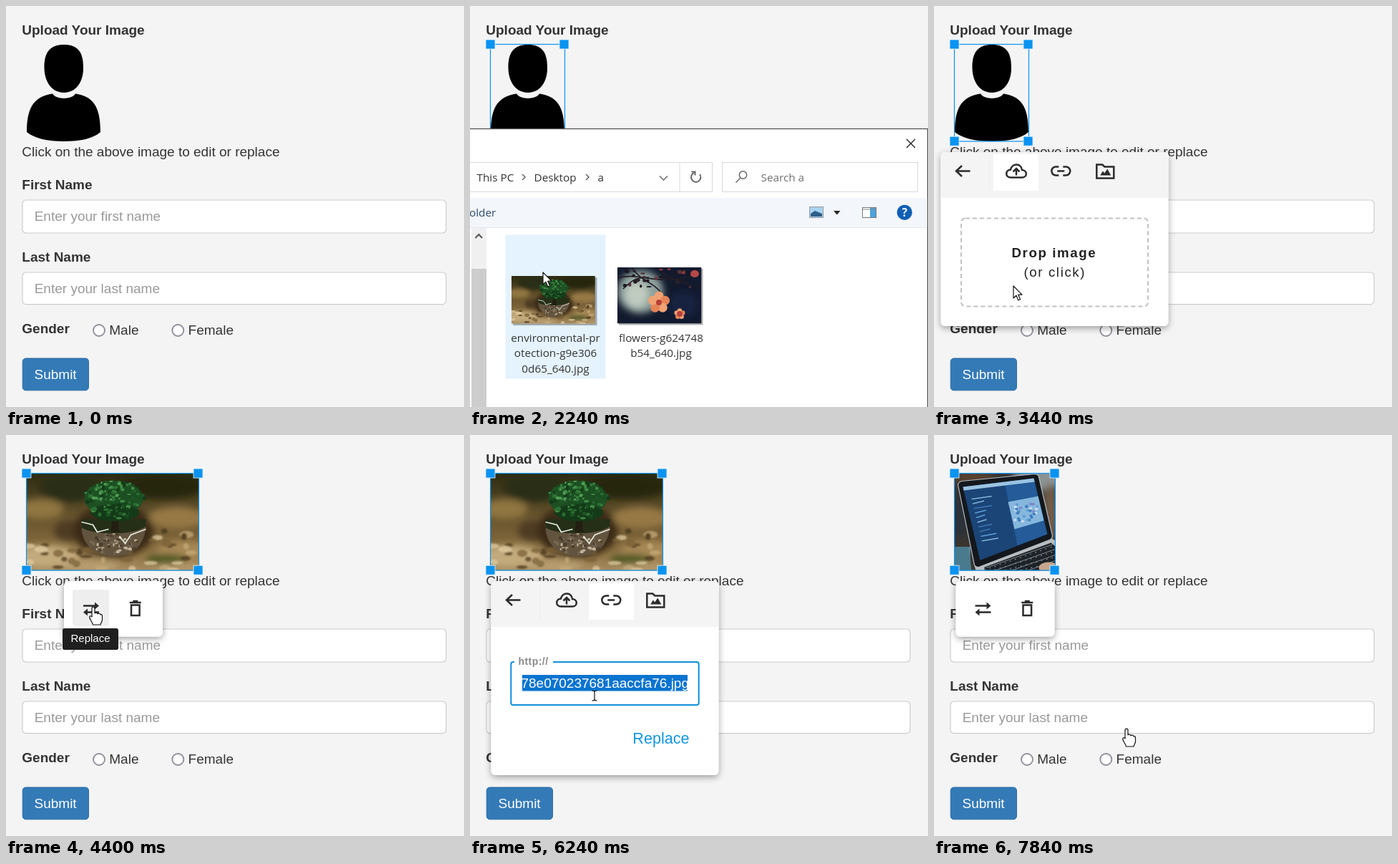
Write an HTML page that moves like this. It is 640 px wide and 560 px high and loops after 8000 ms.

```html
<!DOCTYPE html>
<html lang="en">
<head>
<meta charset="utf-8">
<title>Image upload form</title>
<style>
html, body { margin: 0; width: 100%; height: 100%; overflow: hidden; background: #f4f4f4; }
svg { display: block; width: 100vw; height: 100vh; }
text { font: 19px "Liberation Sans", Arial, sans-serif; fill: #333; white-space: pre; }
.b { font-weight: 700; }
.hint { fill: #999; }
.win text { font: 15.3px "Open Sans", "Noto Sans", sans-serif; fill: #333; }
.box { fill: #fff; stroke: #ccc; stroke-width: 1.2; }
.icon { fill: none; stroke: #2b2b2b; stroke-width: 2.5; }
.icon .full { fill: #2b2b2b; stroke: none; }
.thin { fill: none; stroke: #666; stroke-width: 1.5; }
.cursor { fill: #fff; stroke: #111; stroke-width: 1.2; stroke-linejoin: round; }
.mid { text-anchor: middle; }
</style>
</head>
<body>
<svg id="stage" viewBox="0 0 640 560" preserveAspectRatio="none" xmlns="http://www.w3.org/2000/svg"></svg>
<script>
const LOOP = 8000, STEP = 80;

let seed = 11;
const rnd = (a, b) => {
  seed = (seed * 16807) % 2147483647;
  return a + (b - a) * seed / 2147483647;
};
const many = (n, f) => Array.from({ length: n }, (_, i) => f(i)).join('');
const rect = (x, y, w, h, more = '') => `<rect x="${x}" y="${y}" width="${w}" height="${h}" ${more}/>`;
const path = (d, more = '') => `<path d="${d}" ${more}/>`;
const text = (x, y, s, more = '') => `<text x="${x}" y="${y}" ${more}>${s}</text>`;
const oval = (x, y, rx, ry, fill, more = '') =>
  `<ellipse cx="${x}" cy="${y}" rx="${rx}" ry="${ry}" fill="${fill}" ${more}/>`;
const pick = list => list[Math.floor(rnd(0, list.length))];
const group = (id, body, more = '') => `<g id="${id}" ${more}>${body}</g>`;
const at = (x, y, body) => `<g class="icon" transform="translate(${x} ${y})">${body}</g>`;

// Small ovals strewn evenly over a larger oval
const strew = (n, x, y, rx, ry, size, colours) => many(n, () => {
  const a = rnd(0, 6.28), r = Math.sqrt(rnd(0, 1));
  return oval(x + rx * r * Math.cos(a), y + ry * r * Math.sin(a), rnd(1, size), rnd(1, size * .8), pick(colours));
});

// Icons, each centred on its origin
const icons = {
  back: path('M10.5 0H-9M-1-7.5L-9 0L-1 7.5'),
  cloud: path('M-7.5 9C-16 9-15.5-1.5-8-2C-6-11.5 7-11.5 8-1.5C16-1 15.5 9 8 9Z') +
    path('M0 6V-3M-4.5 1L0-3.5L4.5 1'),
  link: path('M-3-6H-7A6 6 0 0 0-7 6H-3M3-6H7A6 6 0 0 1 7 6H3M-5 0H5'),
  folder: path('M-12-9H-4L-1-6H12V10H-12Z') + path('M-7 6L-3.5 0L-1 3L3-3L8 6Z', 'class="full"'),
  swap: path('M-11-4H7M11 5H-7') + path('M5-9L11-4L5 1ZM-5 0L-11 5L-5 10Z', 'class="full"'),
  bin: path('M-8-8.5H8M-3.5-10.5H3.5M-5.8-5V9.5H5.8V-5Z')
};

const avatar =
  path('M81 54C100 54 108.5 64 108 87C108 107 97 121 81 121C65 121 54 107 53.5 87C53 64 62 54 81 54Z') +
  path('M65 122.5C42 126 29 138 29 176C40 185 58 189 81 189C104 189 122 185 132 176C132 138 120 126 97 122.5C92 131 70 131 65 122.5Z');

const treePhoto = rect(0, 0, 242, 136, 'fill="url(#earth)"') +
  `<g filter="url(#soft)">` +
  oval(20, 50, 32, 14, '#8f7440') + oval(210, 62, 40, 15, '#967844') + oval(62, 20, 44, 20, '#2b2d14') +
  oval(190, 18, 60, 18, '#27270f') + oval(60, 80, 22, 14, '#4e3a20') + oval(122, 80, 56, 38, '#3a2b17') +
  oval(28, 116, 46, 16, '#c2aa7c') + oval(90, 130, 40, 9, '#b79d70') + oval(218, 108, 36, 14, '#a58755') +
  oval(195, 120, 28, 7, '#4a541f') + oval(215, 132, 40, 6, '#b59a6a') +
  `</g><g filter="url(#grain)" opacity=".75">` +
  many(44, () => oval(rnd(0, 242), rnd(80, 136), rnd(3, 10), rnd(2, 5), pick(['#e0cba0', '#7b6237', '#4a391f', '#c4aa78']))) +
  `</g>` +
  path('M77 70C75 98 95 116 122 116C150 116 168 98 167 68Z', 'fill="#62543f"') +
  path('M77 76C95 87 150 87 167 74V64H77Z', 'fill="#252f17"') +
  strew(60, 122, 98, 35, 14, 3, ['#a3947a', '#473d2d', '#c0b296', '#776952']) +
  path('M121 50L118 82H130L126 50Z', 'fill="#231d12"') +
  oval(122, 35, 41, 25, '#1c4f22') + oval(124, 55, 34, 12, '#143a18') +
  strew(110, 122, 36, 43, 27, 4, ['#2c7032', '#1e5526', '#3f8a45', '#133a19', '#184820']) +
  strew(30, 112, 24, 28, 14, 3, ['#4f9c52', '#347c39']) +
  path('M77 68L93 72L99 82L115 78M130 88L138 98L146 86L167 78', 'fill="none" stroke="#e4e8dc" stroke-width="1.8"');

const flowerPhoto = rect(0, 0, 117.5, 78.5, 'fill="#121a2e"') +
  `<g filter="url(#soft)">${oval(32, 34, 32, 30, '#8ea19d')}${oval(27, 38, 16, 18, '#c0cbc0')}${oval(92, 52, 20, 18, '#17233f')}</g>` +
  path('M0 15C30 5 60 30 117 8M20 0C34 22 55 20 66 44M58 0C70 20 90 16 104 26M8 30C20 18 26 14 44 14', 'fill="none" stroke="#241d25" stroke-width="1.7"') +
  many(26, () => oval(rnd(8, 112), rnd(2, 28), rnd(1.5, 4), rnd(1, 3), pick(['#2a2029', '#55303a', '#8e3b3c', '#1b1822']))) +
  oval(108, 9, 6, 5, '#b6484a') +
  [[58, 49], [87, 65]].map(([x, y], i) => many(5, k => {
    const a = k * 1.257 - 1.57, r = i ? 4.5 : 9;
    return oval(x + r * Math.cos(a), y + r * Math.sin(a), r * .72, r * .72, k % 2 ? '#e58458' : '#f0a273');
  }) + oval(x, y, 4, 4, '#b8403a')).join('');

const laptopPhoto = rect(0, 0, 141, 136, 'fill="#3a3531"') +
  `<g filter="url(#soft)">${oval(118, 6, 36, 18, '#8b9391')}${oval(25, 6, 30, 12, '#56402f')}${oval(8, 60, 12, 30, '#2c3337')}${oval(134, 55, 12, 40, '#6f5b48')}</g>` +
  rect(0, 103, 22, 33, 'fill="#6b9aab"') + path('M0 103H20L24 136H0Z', 'fill="#4a7a8e"') +
  path('M28 129L136 91L141 94V136H30Z', 'fill="#b9bdc0"') +
  path('M5 16Q6 12 10 11L112 1Q117 1 118 5L137 87Q137 91 133 93L34 131Q30 132 28 128Z', 'fill="#14181d" stroke="#b4bcc2" stroke-width="1.2"') +
  path('M12 19L111 7L130 85L36 121Z', 'fill="#245b98"') +
  path('M12 19L70 12L88 101L36 121Z', 'fill="#1b4477"') +
  path('M75 40L117 32L125 66L84 78Z', 'fill="#86b7dd"') +
  path('M12 19L111 7L112 12L13 24Z', 'fill="#9bc3e2"') +
  many(10, i => path(`M${24 + i * 1.6} ${36 + i * 6.5}l${rnd(10, 32)} -4`, `stroke="${pick(['#5c9fd8', '#3b78b5', '#7fb5d6'])}" stroke-width="1.4"`)) +
  many(30, () => oval(rnd(84, 116), rnd(42, 68), 2.2, 1.8, pick(['#3d7bbd', '#c9dcec', '#5d9cd0', '#7c86c4']))) +
  path('M42 131L135 97L141 102V130L122 136H42Z', 'fill="#1d2328"') +
  many(5, r => path(`M${42 + r * 7} ${135 + r * 2}L141 ${101 + r * 8}`, 'stroke="#a9b2b8" stroke-width="1.1" stroke-dasharray="1.5 6"') +
    path(`M${44 + r * 9} ${132 + r * 5}L141 ${98 + r * 8}`, 'stroke="#8d969c" stroke-width=".9"')) +
  oval(132, 132, 14, 8, '#c9a58b');

const field = (y, h, hint) => rect(23, y, 592, h, 'rx="5" class="box"') + text(39.7, y + 28.8, hint, 'class="hint"');
const radio = (x, label) => `<circle cx="${x}" cy="453" r="8" fill="#fff" stroke="#8f8f9d" stroke-width="1.9"/>` + text(x + 14.3, 459, label);
const form = rect(0, 0, 640, 560, 'fill="#f4f4f4"') +
  [[39.6, 'Upload Your Image'], [256.3, 'First Name'], [357, 'Last Name'], [456.6, 'Gender']]
    .map(([y, s]) => text(22.3, y, s, 'class="b"')).join('') +
  text(22.3, 209.6, 'Click on the above image to edit or replace') +
  field(271, 46, 'Enter your first name') + field(372, 44.6, 'Enter your last name') +
  radio(130, 'Male') + radio(240.3, 'Female') +
  rect(23.2, 492, 92.3, 44.8, 'rx="4.5" fill="#337ab7" stroke="#2e6da4"') +
  text(39.5, 520.7, 'Submit', 'style="fill:#fff"');

const bar = rect(0, 204, 138, 77.5, 'rx="6" fill="#fff" filter="url(#drop)"') +
  group('hover', rect(12, 216, 51, 51, 'rx="4" fill="#eee"')) +
  at(38, 242.6, icons.swap) + at(99.8, 242.6, icons.bin) +
  group('tip', rect(-2, 270, 78, 30, 'rx="3" fill="#1f1f1f"') +
    text(37, 289, 'Replace', 'class="mid" style="fill:#fff;font-size:15px"'));

const panel = (h, tab, body) => rect(9.5, 204, 318, h, 'rx="6" fill="#fff" filter="url(#drop)"') +
  path('M9.5 268V210Q9.5 204 15.5 204H321.5Q327.5 204 327.5 210V268Z', 'fill="#f4f4f4"') +
  path('M77.5 209V258', 'stroke="#ededed"') + rect(tab, 207, 63, 51, 'fill="#fff"') +
  at(40, 230.5, icons.back) + at(115, 230.5, icons.cloud) + at(177.3, 230.5, icons.link) + at(239.3, 230.5, icons.folder) + body;

const dropPanel = panel(243, 83,
  rect(38, 296.5, 261, 123, 'rx="6" fill="none" stroke="#c2c2c2" stroke-width="2" stroke-dasharray="6 4"') +
  text(108.5, 350.5, 'Drop image', 'class="b" style="fill:#222;font-size:18.7px;letter-spacing:1.6px"') +
  text(125.5, 377.8, '(or click)', 'style="fill:#222;font-size:18.7px;letter-spacing:1.6px"'));

const linkPanel = panel(271, 146,
  rect(37.3, 317, 262.4, 60, 'id="frame" rx="3" fill="#fff" stroke-width="2"') +
  rect(42, 312, 54, 10, 'fill="#fff"') +
  text(47.5, 321, 'http://', 'class="b" style="fill:#8a8a8a;font-size:14px;letter-spacing:.45px"') +
  `<g clip-path="url(#entry)">${rect(53, 335, 231, 22.5, 'id="mark" fill="#0a74d0"')}` +
  text(286, 353, '', 'id="url" text-anchor="end"') + '</g>' +
  text(207.3, 430.8, 'Replace', 'style="fill:#1496e0;font-size:21.6px"'));

const lines = (x, list) => list.map((s, i) => text(x, 469 + i * 21.4, s, 'class="mid"')).join('');
const dialog = rect(-2, 171.5, 641.5, 392, 'fill="#fff" stroke="#555" stroke-width="1.3"') +
  path('M610 186L622 198M622 186L610 198', 'stroke="#222" stroke-width="1.4"') +
  `<g fill="#fff" stroke="#d9d9d9">${rect(-5, 218.5, 343.5, 41)}${rect(352.5, 218.5, 273, 41)}${path('M293 218V259')}</g>` +
  text(9.5, 245, 'This PC') + text(89.5, 245, 'Desktop') + text(178.5, 245, 'a') +
  text(406.5, 245, 'Search a', 'style="fill:#707070"') +
  `<g class="thin">${path('M73 235L77 239L73 243M162 235L166 239L162 243M265 237.5L270.5 243L276 237.5')}` +
  path('M321 235A6.7 6.7 0 1 1 313 233', 'stroke-width="2"') + path('M309.5 231.5H314.5V236.5', 'stroke-width="2"') +
  `<circle cx="381.5" cy="236" r="5.2"/>${path('M378 240L371.5 246.5')}</g>` +
  rect(0, 268, 639, 41, 'fill="#f3f6fa"') + path('M0 309.5H639', 'stroke="#e3e8ee"') +
  text(-1, 294, 'older', 'style="fill:#2b4a6f"') +
  rect(474.5, 280.5, 19, 15, 'fill="#a9d3f2" stroke="#9a9a9a"') + path('M476 294V290L482 286L492 290V294Z', 'fill="#2e5f88"') +
  path('M508 286H517.5L512.8 291.5Z', 'fill="#222"') +
  rect(548.5, 281.5, 19, 14, 'fill="#fff" stroke="#777"') + rect(559, 282, 8, 13, 'fill="#4da3dc"') + path('M549 284H567', 'stroke="#888"') +
  '<circle cx="607.3" cy="288.3" r="10.6" fill="#0f5fb5"/>' +
  text(607.3, 294, '?', 'class="mid" style="fill:#fff;font-weight:700"') +
  rect(2, 310, 21, 250, 'fill="#f0f0f0"') + rect(2, 367, 21, 193, 'fill="#cdcdcd"') +
  path('M7.5 324L12.3 319L17 324', 'fill="none" stroke="#555" stroke-width="2"') +
  rect(49.5, 319.5, 140, 201, 'id="item"') +
  rect(60, 379, 117.5, 67, 'fill="#000" opacity=".3"') + rect(208, 367, 117.5, 78.5, 'fill="#000" opacity=".3"') +
  '<use href="#tree" transform="translate(58 377) scale(.484 .49)"/>' +
  `<g transform="translate(206 365)" clip-path="url(#flowerBox)">${flowerPhoto}</g>` +
  lines(119.5, ['environmental-pr', 'otection-g9e306', '0d65_640.jpg']) +
  lines(267, ['flowers-g624748', 'b54_640.jpg']);

const clip = (id, x, y, w, h) => `<clipPath id="${id}">${rect(x, y, w, h)}</clipPath>`;
const defs = `<defs>
  <linearGradient id="earth" x2="0" y2="1"><stop stop-color="#2c2b12"/><stop offset=".4" stop-color="#62502b"/><stop offset=".75" stop-color="#84693d"/><stop offset="1" stop-color="#a68b5e"/></linearGradient>
  <filter id="soft" x="-20%" y="-20%" width="140%" height="140%"><feGaussianBlur stdDeviation="5"/></filter>
  <filter id="grain"><feGaussianBlur stdDeviation="1.3"/></filter>
  <filter id="drop" x="-20%" y="-20%" width="140%" height="150%"><feDropShadow dx="0" dy="3" stdDeviation="5" flood-opacity=".36"/></filter>
  ${clip('treeBox', 0, 0, 241, 136)}${clip('flowerBox', 0, 0, 117.5, 78.5)}${clip('laptopBox', 0, 0, 141, 136)}${clip('entry', 53, 330, 231, 32)}
  <g id="tree" clip-path="url(#treeBox)">${treePhoto}</g></defs>`;

const handles = many(4, () => rect(0, 0, 13, 13, 'class="grip" fill="#0a93f0" stroke="#e6f3fc" stroke-width=".8"'));

document.getElementById('stage').innerHTML = defs + form +
  group('img0', avatar) +
  group('img1', '<use href="#tree" x="28.5" y="53.5"/>') +
  group('img2', `<g transform="translate(28.5 53.5)" clip-path="url(#laptopBox)">${laptopPhoto}</g>`) +
  group('pickBox', rect(28.5, 53.5, 10, 135.5, 'id="edge" fill="none" stroke="#0a93f0" stroke-width="1.2"') + handles) +
  group('bar', bar) + group('drop-view', dropPanel) + group('link-view', linkPanel) +
  group('dialog', dialog, 'class="win"') +
  group('pointer',
    group('arrow', path('M0 0V17L4 13.2L6.8 20L9.6 18.8L6.8 12.2H12Z')) +
    group('hand', path('M-2 13V2C-2-.6 2-.6 2 2V9C3 7.6 6 8 6 10C7 8.6 10 9 10 11C11 10 12.5 10.6 12.5 13V18C12.5 21 10.5 22 10 25H-.5C-1 22-4.5 18-5.2 15C-5.5 12.5-3.5 12-2 14Z')) +
    group('beam', path('M-3.5-7Q0-7 0-5Q0-7 3.5-7M0-6V6M-3.5 7Q0 7 0 5Q0 7 3.5 7', 'fill="none"')), 'class="cursor"');

// time, picture, open view, horizontal offset of that view
const cues = [
  [0, 0, '', 0], [320, 0, 'bar', 11], [1120, 0, 'drop-view', 0], [2000, 0, 'dialog', 0],
  [3200, 0, 'drop-view', 0], [3520, 1, 'bar', 81], [4640, 1, 'drop-view', 20],
  [5120, 1, 'link-view', 20], [7680, 2, 'bar', 30.5]
];
// time, pointer x, y, shape from then on
const moves = [
  [80, 272, 428, 'arrow'], [160, 90, 125, 'hand'], [320, 90, 125, 'arrow'], [880, 49, 243, 'hand'],
  [1120, 49, 243, 'arrow'], [1200, 49, 243, 'arrow'], [1760, 160, 362, 'hand'], [2000, 160, 362, 'arrow'],
  [2240, 102, 372, 'arrow'], [2400, 102, 372, 'arrow'], [2720, 111, 391, 'arrow'], [3520, 111, 391, 'arrow'],
  [4240, 122, 240, 'hand'], [4640, 122, 240, 'arrow'], [5040, 197, 232, 'hand'], [5440, 197, 232, 'arrow'],
  [5840, 174, 364, 'beam'], [6320, 174, 364, 'beam'], [6400, 178, 361, 'beam'], [6560, 178, 361, 'beam'],
  [6640, 169, 362, 'beam'], [6800, 169, 362, 'beam'], [7200, 269, 410, 'hand'], [LOOP, 269, 410, 'hand']
];
const widths = [104, 241, 141];
const views = ['bar', 'drop-view', 'link-view', 'dialog'];

const el = id => document.getElementById(id);
const show = (id, on) => { el(id).style.display = on ? '' : 'none'; };
const set = (node, props) => { for (const k in props) node.setAttribute(k, props[k]); };
const latest = (list, t) => list.reduce((n, row, i) => row[0] <= t ? i : n, -1);
const grips = document.querySelectorAll('.grip');

function pointerAt(t) {
  const i = latest(moves, t);
  if (i < 0) return null;
  const a = moves[i], b = moves[i + 1] || a;
  const p = (t - a[0]) / (b[0] - a[0] || 1), e = p * p * (3 - 2 * p);
  return { x: a[1] + (b[1] - a[1]) * e, y: a[2] + (b[2] - a[2]) * e, shape: a[3] };
}

function draw(time) {
  const t = Math.floor((time % LOOP) / STEP) * STEP;
  const [, img, view, shift] = cues[latest(cues, t)];
  const p = pointerAt(t);

  widths.forEach((_, i) => show('img' + i, i === img));
  views.forEach(id => show(id, id === view));
  if (view) el(view).setAttribute('transform', `translate(${shift} 0)`);

  show('pickBox', view !== '');
  set(el('edge'), { width: widths[img] });
  grips.forEach((g, i) => set(g, {
    x: 22 + (i % 2) * (widths[img] - 1),
    y: i < 2 ? 47 : 182.2
  }));

  const over = p && view === 'bar' && p.x > shift + 12 && p.x < shift + 63 && p.y > 216 && p.y < 267;
  show('hover', over);
  show('tip', over);

  const marked = t >= 6000 && t < 6880;
  show('mark', marked);
  set(el('frame'), { stroke: t >= 5920 ? '#0e8fd6' : '#c2c2c2' });
  el('url').textContent = t < 6880 ? '78e070237681aaccfa76.jpg' : '/photos/laptop-desk_640.jpg';
  el('url').style.fill = marked ? '#fff' : '#333';

  const chosen = t >= 2800;
  set(el('item'), {
    fill: chosen ? '#cce8ff' : t >= 2160 ? '#e5f3ff' : 'none',
    stroke: chosen ? '#99d1ff' : 'none'
  });

  show('pointer', p);
  if (p) {
    el('pointer').setAttribute('transform', `translate(${p.x} ${p.y})`);
    ['arrow', 'hand', 'beam'].forEach(s => show(s, s === p.shape));
  }
}

const start = performance.now();
function tick() {
  draw(performance.now() - start);
  requestAnimationFrame(tick);
}
tick();
</script>
</body>
</html>
```
